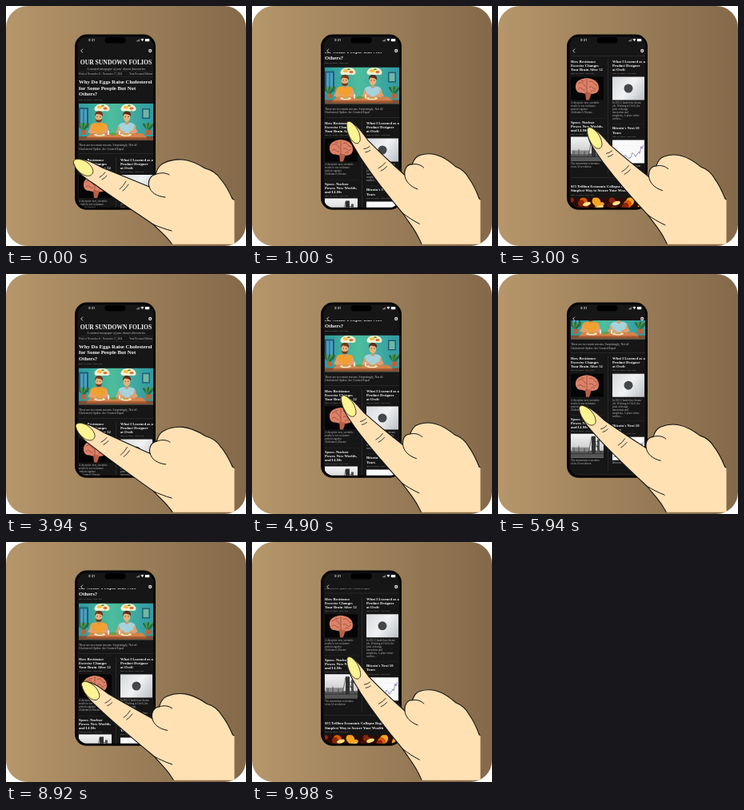
Recreate the animation shown at these times as an HTML page with a canvas. Size 300 by 300 pixels, loop 10000 ms.

```html
<!DOCTYPE html>
<html lang="en">
<head>
<meta charset="utf-8">
<title>Scrolling a newspaper app</title>
<style>
html, body { margin: 0; width: 100%; height: 100%; overflow: hidden; background: #fff; }
canvas { display: block; width: 300px; height: 300px; }
</style>
</head>
<body>
<canvas id="stage"></canvas>
<script>
const canvas = document.getElementById('stage');
const ctx = canvas.getContext('2d');
const dpr = window.devicePixelRatio || 1;
canvas.width = canvas.height = 300 * dpr;

const LOOP = 10000, SWING = 1900, SCROLL = 2 * SWING;
const SERIF = '"Liberation Serif", "Times New Roman", serif';
const SANS = 'Inter, Arial, sans-serif';

// Motion

// The CSS "ease" curve: cubic-bezier(.25, .1, .25, 1)
function ease(x) {
  if (x <= 0) return 0;
  if (x >= 1) return 1;
  let lo = 0, hi = 1;
  for (let i = 0; i < 24; i++) {
    const s = (lo + hi) / 2, r = 1 - s;
    if (0.75 * r * r * s + 0.75 * r * s * s + s ** 3 < x) lo = s; else hi = s;
  }
  const s = lo, r = 1 - s;
  return 0.3 * r * r * s + 3 * r * s * s + s ** 3;
}

const ramp = (t, from, to) => ease((t - from) / (to - from));

function handAngle(time) {
  const t = time % SWING;
  return 15 * (ramp(t, 92, 575) - ramp(t, 950, 1900));
}

function scrollOffset(time) {
  const t = time % SCROLL;
  return 45.5 * ramp(t, 92, 575) + 77 * ramp(t, SWING + 92, SWING + 575) - 122.5 * ramp(t, 3610, 3800);
}

// Drawing helpers

function rect(x, y, w, h, fill) {
  ctx.fillStyle = fill;
  ctx.fillRect(x, y, w, h);
}

function round(x, y, w, h, r, fill) {
  ctx.beginPath();
  ctx.roundRect(x, y, w, h, r);
  ctx.fillStyle = fill;
  ctx.fill();
}

function oval(x, y, rx, ry, fill, turn = 0) {
  ctx.beginPath();
  ctx.ellipse(x, y, rx, ry, turn, 0, 7);
  ctx.fillStyle = fill;
  ctx.fill();
}

function stroke(path, color = '#111', width = 1) {
  ctx.strokeStyle = color;
  ctx.lineWidth = width;
  ctx.stroke(new Path2D(path));
}

function shape(path, fill) {
  ctx.fillStyle = fill;
  ctx.fill(new Path2D(path));
}

function clipped(x, y, w, h, r, draw) {
  ctx.save();
  ctx.beginPath();
  ctx.roundRect(x, y, w, h, r);
  ctx.clip();
  draw();
  ctx.restore();
}

function text(str, x, y, size, color = '#fff', style = '', align = 'left', family = SERIF) {
  ctx.font = `${style} ${size}px ${family}`;
  ctx.fillStyle = color;
  ctx.textAlign = align;
  ctx.textBaseline = 'middle';
  ctx.fillText(str, x, y);
}

function lines(list, x, y, step, size, color, style) {
  list.forEach((str, i) => text(str, x, y + i * step, size, color, style));
}

const headline = (list, x, y) => lines(list, x, y, 5.1, 4.65, '#f4f4f4', 'bold');
const caption = (list, x, y) => lines(list, x, y, 4, 3.3, '#b5b5b5');
const dateline = (x, y) => text('Nov 15, 2024 · 9:03 AM', x, y, 2.9, '#aaa');

// Article pictures

function diner(x, shirt, hair, beard) {
  round(x - 11, 146, 22, 20, 6, shirt);
  shape(`M${x - 9} 149L${x - 14} 158L${x - 3} 160L${x - 3} 157L${x - 8} 155Z`, '#e4a06d');
  shape(`M${x + 9} 149L${x + 14} 158L${x + 3} 160L${x + 3} 157L${x + 8} 155Z`, '#e4a06d');
  rect(x - 2, 143, 4, 5, '#d99560');
  oval(x, 139, 4.3, 5.6, '#edb07c');
  if (beard) shape(`M${x - 4.3} 141Q${x} 144 ${x + 4.3} 141Q${x + 3} 146 ${x} 145.5Q${x - 3} 146 ${x - 4.3} 141Z`, hair);
  shape(`M${x - 5} 138Q${x - 5} 131 ${x} 131.5Q${x + 6} 131 ${x + 5} 138Q${x + 3} 135 ${x - 3} 135Z`, hair);
  rect(x - 2.4, 138, 1, 1, '#222');
  rect(x + 1.4, 138, 1, 1, '#222');
}

function thought(x) {
  oval(x, 127, 8.5, 4.6, '#fff1d2');
  oval(x - 6, 128.5, 3.5, 3, '#fff1d2');
  oval(x + 6, 128.5, 3.5, 3, '#fff1d2');
  oval(x - 3, 126.5, 3.2, 2, '#f4c34c');
  oval(x + 4, 128, 2.6, 1.7, '#dc713c');
  oval(x + 1, 124.7, 2, 1.1, '#6a9d45');
}

function plant(x, y) {
  for (let i = -2; i <= 2; i++) oval(x + i * 1.6, y - 4, 1.6, 5.5, i % 2 ? '#4d9b4d' : '#266b48', i * 0.35);
  rect(x - 3, y, 6, 6, '#bd6337');
}

function dinner() {
  clipped(91, 122, 93, 46, 0, () => {
    const wall = ctx.createLinearGradient(91, 0, 184, 0);
    wall.addColorStop(0, '#2f9aa0');
    wall.addColorStop(0.45, '#4dbd9c');
    wall.addColorStop(1, '#3299a4');
    rect(91, 122, 93, 46, wall);
    rect(91, 127, 12, 25, '#1c5f78');
    rect(93, 129, 8, 21, '#4b9fc0');
    rect(96.5, 129, 1, 21, '#1c5f78');
    rect(170, 128, 10, 13, '#1d5f74');
    rect(171.5, 129.5, 7, 10, '#71b6a3');
    plant(97, 155);
    plant(178, 155);
    thought(120);
    thought(153);
    diner(116, '#f0a02f', '#75381e', true);
    diner(151, '#a5d3dc', '#5a2d1c', false);
    rect(91, 163, 93, 5, '#7d5136');
    shape('M106 159H170L176 164H101Z', '#d5834c');
    rect(101, 164, 75, 2, '#a85a33');
    [117, 150].forEach(x => {
      oval(x, 161, 7, 1.8, '#f7e8cf');
      oval(x, 160.3, 4, 1.2, '#c9a34a');
    });
    oval(134, 160, 4, 1.8, '#5ea34b');
    [127, 141].forEach(x => rect(x, 156, 2, 5, '#d8e8df'));
  });
}

function brain() {
  rect(91, 211, 41, 29, '#050505');
  shape('M97 225Q96 217 104 214Q111 211 118 214Q126 217 126 225Q126 231 120 232Q113 234 104 231Q98 231 97 225Z', '#dc8268');
  shape('M109 230L117 231L114 240L110 240Z', '#b95f48');
  stroke('M111 213.5V231M100 220q4-4 7 0t3 4M100 226q3-3 5 0t4 1M114 217q4-2 6 2t4 2M114 224q3-2 5 1t5-1M104 216q3 1 4 0M116 229q3-2 5 0', '#8e3f32', 0.7);
}

function badgePhoto() {
  const wall = ctx.createLinearGradient(143, 211, 183, 240);
  wall.addColorStop(0, '#d5d8db');
  wall.addColorStop(0.5, '#f1f2f3');
  wall.addColorStop(1, '#b9bec4');
  rect(143, 211, 40, 29, wall);
  oval(163, 225.5, 5.5, 5.5, '#444649');
}

function tower() {
  const sky = ctx.createLinearGradient(0, 286, 0, 316);
  sky.addColorStop(0, '#f3f3f3');
  sky.addColorStop(1, '#b9b9b9');
  rect(91, 286, 41, 30, sky);
  rect(91, 307, 41, 9, '#555');
  rect(92, 303, 22, 5, '#888');
  rect(117, 289, 5, 22, '#333');
  rect(124, 293, 3, 19, '#555');
  stroke('M113 311L117 290L129 311M117 296h9M117 302h9M91 311h41M95 303v6M101 301v8M108 304v5', '#222', 0.6);
}

function priceChart() {
  rect(143, 290, 40, 29, '#fafafa');
  stroke('M144 297h38M144 304h38M144 311h38', '#e3e3e8', 0.3);
  stroke('M144 315l4-.5 3 .3 3-2 2 1 3-5 2 2 2 2 3-1 2-6 2 2 2 3 2-3 2-3 1 2 2-9 1 3 2-5', '#6866ad', 0.7);
}

function fire() {
  clipped(91, 362, 93, 44, 0, () => {
    rect(91, 362, 93, 44, '#2b0c06');
    for (let i = 0; i < 34; i++) {
      const x = 91 + (i * 37) % 93, y = 365 + (i * 13) % 24;
      oval(x, y, 4 + i % 4, 3 + i % 3, ['#8e2508', '#d95a0b', '#f7a422', '#4a1208'][i % 4], i);
    }
    [[111, 370], [127, 374], [148, 369]].forEach(([x, y]) => oval(x, y, 5, 2.4, '#ffe183', -0.3));
  });
}

// Screen

function page() {
  text('OUR SUNDOWN FOLIOS', 137.5, 71, 7.65, '#f4f4f4', 'bold', 'center');
  text('A curated newspaper of your chosen discoveries', 137.5, 78.7, 3.75, '#ccc', 'italic', 'center');
  rect(91, 81.6, 93, 0.4, '#333');
  text('Week of November 11 - November 17, 2024', 91, 85.3, 3.05, '#bbb');
  text('Your Personal Edition', 154, 85.3, 3.3, '#bbb');
  rect(91, 88.6, 93, 0.4, '#333');

  lines(['Why Do Eggs Raise Cholesterol', 'for Some People But Not', 'Others?'], 91, 95.7, 7.4, 6.75, '#f4f4f4', 'bold');
  dateline(91, 117);
  dinner();
  lines(['There are two main reasons. Surprisingly, Not all', 'Cholesterol Spikes Are Created Equal'], 91, 174.3, 4.6, 3.7, '#c4c4c4');

  rect(91, 184.5, 93, 0.5, '#3a3a3a');
  rect(137.2, 189, 0.5, 144, '#3a3a3a');

  headline(['How Resistance', 'Exercise Changes', 'Your Brain After 52'], 91, 192.3);
  dateline(91, 207);
  brain();
  caption(['A deceptive new, scientific', 'results to use resistance', 'protects against', "Alzheimer's Disease"], 91, 244);

  headline(['What I Learned as a', 'Product Designer', 'at Ovelt'], 143, 192.3);
  dateline(143, 207);
  badgePhoto();
  caption(['In 2011 I landed my dream', 'job. Working at Ovelt, the', 'peak of design,', 'innovation and', 'simplicity. A place where', 'endless…'], 143, 244);

  rect(91, 262.5, 42, 0.4, '#333');
  headline(['Space, Nuclear', 'Power, New Worlds,', 'and LLMs'], 91, 268.3);
  dateline(91, 283);
  tower();
  caption(['The momentum economics', 'of an AI revolution'], 91, 319.8);

  rect(143, 269.5, 41, 0.4, '#333');
  headline(["Bitcoin's Next 10", 'Years'], 143, 275.7);
  dateline(143, 286);
  priceChart();
  caption(['Bitcoin enters 99% of year'], 143, 322.3);

  rect(91, 337, 93, 0.5, '#3a3a3a');
  headline(['$35 Trillion Economic Collapse Begins:', 'Simplest Way to Secure Your Wealth'], 91, 348);
  dateline(91, 358.3);
  fire();
}

function phone(scroll) {
  round(86, 35.5, 101, 219.3, 15, '#050505');

  clipped(89.3, 38.3, 95, 213.5, 12.5, () => {
    rect(89, 38, 96, 214, '#161616');
    clipped(89, 58, 96, 194, 0, () => {
      ctx.translate(0, -scroll);
      page();
    });
  });

  text('9:31', 103, 42.7, 3.9, '#c8c8c8', 'bold', 'left', SANS);
  round(123.5, 39, 26, 7.5, 3.75, '#000');
  for (let i = 0; i < 4; i++) rect(163 + i * 1.1, 43.3 - i * 0.6, 0.8, 1 + i * 0.6, '#999');
  shape('M168.4 41.6q2-1.8 4 0l-2 2.7z', '#ddd');
  round(173.8, 41, 5.5, 3.2, 0.9, '#fff');
  stroke('M96 53.6l-2.3 2.4 2.3 2.4', '#ddd', 0.9);
  ctx.beginPath();
  ctx.arc(180.2, 56, 1.5, 0, 7);
  ctx.strokeStyle = '#ddd';
  ctx.lineWidth = 1.3;
  ctx.stroke();
}

// Hand

// Turns a path of absolute coordinates about the wrist; the fingertip turns most, the wrist stays put.
function bend(path, angle) {
  return path.replace(/([\d.]+) ([\d.]+)/g, (_, px, py) => {
    const x = px - 283, y = py - 297;
    const turn = angle * Math.PI / 180 * Math.max(0, (300 - px) / 203);
    const c = Math.cos(turn), s = Math.sin(turn);
    return `${(283 + x * c - y * s).toFixed(2)} ${(297 + x * s + y * c).toFixed(2)}`;
  });
}

function hand(angle) {
  const outline = bend('M86 200C83 195 87 191 94 191.5C103 192 111 197 120 202C140 210 160 218 179 226' +
    'C177 219 180 212 187 210.5C189 204 191 199 197 196.5C204 193 212 191.5 220 192C232 193 241 198 249 203' +
    'C257 205 264 210 268 216C275 224 279 232 283 241L300 250L300 330L225 330' +
    'C219 317 213 305 207 297C201 288 193 282 184 273C162 258 139 243 115 226C106 219 91 212 86 200Z', angle);
  const folds = bend('M179 226C181 233 188 238 199 239M187 210.5C193 208 199 208 204 211M184 273C191 276 199 279 207 281', angle);
  const creases = bend('M117 214Q121 212 124 208M120 217Q124 215 126 212M142 229Q147 225 150 219M146 231Q150 228 153 223', angle);
  const nail = bend('M85 198C82.5 193.5 86.5 190.5 92 191.5C100 193 107 198.5 108.8 205.5C109.5 210.5 105 213.5 99.5 212C93 210 87.3 204 85 198Z', angle);

  clipped(80, 50, 205.5, 247.8, 0, () => {
    ctx.lineJoin = ctx.lineCap = 'round';
    shape(outline, '#ffe1b4');
    stroke(outline, '#111', 1.1);
    stroke(folds, '#111', 1);
    stroke(creases, '#222', 0.9);
    shape(nail, '#fff494');
    stroke(nail, '#332d18', 0.9);
  });
}

function backdrop() {
  rect(0, 0, 300, 300, '#fff');
  const tan = ctx.createLinearGradient(0, 0, 300, 0);
  tan.addColorStop(0, '#b6966a');
  tan.addColorStop(1, '#84694a');
  round(0, 0, 300, 300, 27, tan);
}

function render(time) {
  ctx.setTransform(dpr, 0, 0, dpr, 0, 0);
  backdrop();
  phone(scrollOffset(time));
  hand(handAngle(time));
}

const start = performance.now();
function tick() {
  render((performance.now() - start) % LOOP);
  requestAnimationFrame(tick);
}
tick();
</script>
</body>
</html>
```
